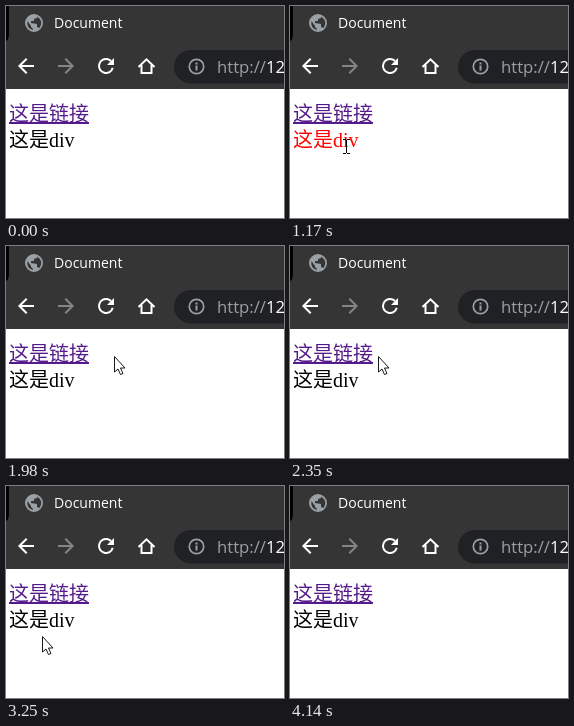
Write an HTML page with a canvas that moves like this. It is 278 by 212 pixels and loops after 4430 ms.

```html
<!DOCTYPE html>
<html lang="zh-CN">
<head>
<meta charset="utf-8">
<title>Document</title>
<style>
  html, body { margin: 0; width: 100%; height: 100%; overflow: hidden; background: #fff; }
  canvas { display: block; width: 278px; height: 212px; }
</style>
</head>
<body>
<canvas id="stage" width="278" height="212"></canvas>
<script>
const ctx = document.getElementById('stage').getContext('2d');
const LOOP = 4430, STEP = 30, ENTER = 460, LEAVE = 4140;
const BAR = '#353535', PILL = '#202124', GREY = '#9aa0a6', WHITE = '#fff';
const UI = '"Open Sans", "Noto Sans", sans-serif';
const PAGE = '350 20px "Liberation Serif", "Noto Sans CJK SC", "Noto Sans CJK", serif';

// The pointer glides to each stop and rests there until the next glide.
const entry = { x: 173, y: 206 };
const glides = [
  { at: 460, time: 450, x: 56, y: 141 },
  { at: 1170, time: 180, x: 126, y: 151 },
  { at: 1350, time: 210, x: 72, y: 105 },
  { at: 1890, time: 150, x: 127, y: 112 },
  { at: 2230, time: 150, x: 83, y: 110 },
  { at: 2540, time: 180, x: 52, y: 124 },
  { at: 2950, time: 150, x: 36, y: 150 },
  { at: 3320, time: 270, x: 33, y: 98 },
  { at: 3680, time: 120, x: 30, y: 149 },
  { at: 3960, time: 180, x: 240, y: 213 }
];

const ease = p => p * p * (3 - 2 * p);
const mix = (a, b, p) => Math.round(a + (b - a) * p);

function pointerAt(t) {
  if (t < ENTER || t >= LEAVE) return null;
  const i = glides.findLastIndex(g => g.at <= t);
  const from = glides[i - 1] || entry, to = glides[i];
  const passed = Math.floor((t - to.at) / STEP) * STEP;
  const p = ease(Math.min(1, passed / to.time));
  return { x: mix(from.x, to.x, p), y: mix(from.y, to.y, p) };
}

function rect(x, y, w, h, color) {
  ctx.fillStyle = color;
  ctx.fillRect(x, y, w, h);
}

function text(str, x, y, font, color) {
  ctx.font = font;
  ctx.fillStyle = color;
  ctx.fillText(str, x, y);
}

function line(d, color, width) {
  ctx.strokeStyle = color;
  ctx.lineWidth = width;
  ctx.stroke(new Path2D(d));
}

function fill(d, color) {
  ctx.fillStyle = color;
  ctx.fill(new Path2D(d));
}

function at(x, y, paint) {
  ctx.save();
  ctx.translate(x, y);
  paint();
  ctx.restore();
}

function ring(r, color, width, from = 0, to = Math.PI * 2) {
  ctx.beginPath();
  ctx.arc(0, 0, r, from, to);
  ctx.strokeStyle = color;
  ctx.lineWidth = width;
  ctx.stroke();
}

function globe() {
  ring(4.5, GREY, 9);
  fill('M-6.5 -2 L-3 3 V4 L-1 6 V7 Q-8 5 -6.5 -2Z', BAR);
  fill('M3 -6.5 Q10 -2 5.5 5 L3 4 V1 L-3 0 V-2 H0 V-4 L3 -5Z', BAR);
}

function arrow() {
  line('M8 0 H-6 M.7 -7.3 L-6.6 0 L.7 7.3', WHITE, 2);
}

function reload() {
  ring(7, WHITE, 2, Math.PI / 12, Math.PI * 1.75);
  fill('M8 -8 V-1 H1Z', WHITE);
}

function home() {
  line('M-5 -1 V7 H5 V-1 M-8 1 L0 -6.7 L8 1', WHITE, 2);
}

function info() {
  ring(7.2, GREY, 1.7);
  rect(-1, -1, 2, 5, GREY);
  rect(-1, -4, 2, 2, GREY);
}

function chrome() {
  rect(0, 0, 278, 83, BAR);
  fill('M0 0 H3 V27 Q3 34 0 35Z', '#000');
  at(28, 17, globe);
  text('Document', 48, 22, '500 14px ' + UI, WHITE);

  at(20, 60, arrow);
  at(60, 60, () => {
    ctx.scale(-1, 1);
    ctx.globalAlpha = 0.4;
    arrow();
  });
  at(100, 60, reload);
  at(140.5, 60, home);

  ctx.fillStyle = PILL;
  ctx.beginPath();
  ctx.roundRect(168, 44, 150, 33.5, 17);
  ctx.fill();
  at(190.5, 60.5, info);
  text('http://', 211, 67, '16.7px ' + UI, GREY);
  text('12', 260, 67, '16.7px ' + UI, WHITE);
}

function page(onLink, onDiv) {
  if (onLink) rect(3, 97, 80, 22, 'blueviolet');
  const color = onLink ? 'chartreuse' : '#551a8b';
  rect(3, 116, 80, 2, color);
  text('这是链接', 3, 115, PAGE, color);
  text('这是div', 3, 141, PAGE, onDiv ? 'red' : 'black');
}

function outlined(d) {
  fill(d, WHITE);
  line(d, '#000', 0.9);
}

const cursors = {
  arrow() {
    outlined('M.5 .5 V16 L4 13 L6.5 18.5 L9 17.5 L6.5 12 H11Z');
  },
  hand() {
    outlined('M-2 15 V2 Q0 -1 2 2 V8 Q5 6 5.5 9 Q8 7 8.5 10 Q10 10 10.3 12 ' +
      'V17 L8 22 V24 H-1 V22 L-7 14 Q-6 10 -2 15Z');
    line('M2 8 V13 M5.5 9 V13 M8.5 10 V13', '#000', 0.9);
  },
  beam() {
    line('M.5 -7 V6 M-3 -7.5 H0 M1 -7.5 H4 M-3 6.5 H0 M1 6.5 H4', '#000', 1);
  }
};

function draw(t) {
  const p = pointerAt(t);
  const onLink = p && p.x <= 83 && p.y >= 97 && p.y < 119;
  const onDiv = p && p.y >= 121 && p.y < 147;
  rect(0, 0, 278, 212, WHITE);
  chrome();
  page(onLink, onDiv);
  if (p) at(p.x, p.y, cursors[onLink ? 'hand' : onDiv && p.x < 69 ? 'beam' : 'arrow']);
}

const begin = performance.now();
function tick() {
  draw((performance.now() - begin) % LOOP);
  requestAnimationFrame(tick);
}
tick();
</script>
</body>
</html>
```
